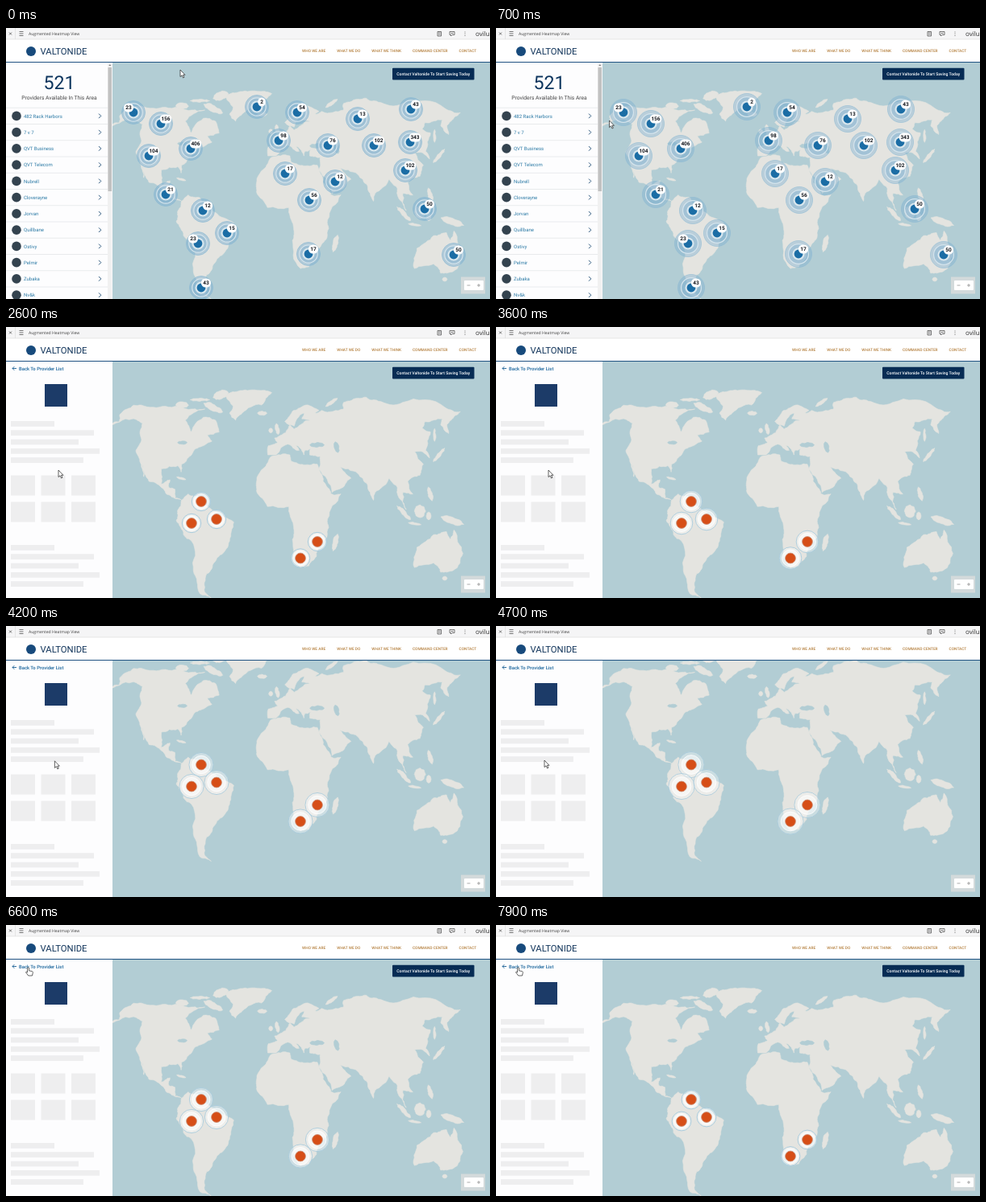
These frames come from a looping animation (600 by 337 pixels, 8 s). An HTML page:

```html
<!DOCTYPE html>
<html lang="en">
<head>
<meta charset="utf-8">
<title>Heatmap View</title>
<style>
  html, body { margin: 0; width: 100%; height: 100%; overflow: hidden; background: #fff; }
  svg { display: block; width: 100vw; height: 100vh; font-family: Roboto, "Liberation Sans", sans-serif; text-rendering: geometricPrecision; }
</style>
</head>
<body>
<svg id="stage" viewBox="0 0 600 337" preserveAspectRatio="none">
  <defs><clipPath id="view"><rect x="132" y="43" width="468" height="294"/></clipPath></defs>
  <g clip-path="url(#view)">
    <g id="map">
      <rect x="132" y="0" width="468" height="400" fill="#b2cdd4"/>
      <g id="land" stroke-linejoin="round" stroke-width=".6"></g>
      <g id="blue"></g>
      <g id="orange"></g>
      <rect x="479" y="49.700" width="101.500" height="14.800" rx="1" fill="#072c54"/>
      <text x="529.700" y="59" font-size="5.100" font-weight="500" fill="#fff" text-anchor="middle">Contact Valtonide To Start Saving Today</text>
    </g>
    <rect x="564" y="309.500" width="30" height="21" fill="#d3dadb"/>
    <rect x="568" y="314" width="24" height="12" rx="1" fill="#fff"/>
    <path d="M571.500 320h4M584 320h4M586 318v4" stroke="#888" stroke-width=".7"/>
  </g>
  <rect y="43" width="132" height="294" fill="#fdfdfe"/>
  <g id="list"></g>
  <g id="detail"></g>
  <rect width="600" height="43" fill="#fff"/>
  <rect width="600" height="14" fill="#f5f5f6"/>
  <path d="M0 14h600M11.500 0v14" stroke="#dedede" stroke-width=".7"/>
  <path d="M4 5.500l3 3m0-3l-3 3M16.500 4.500h5M16.500 7h5M16.500 9.500h5" stroke="#555" stroke-width=".8"/>
  <text x="28" y="9" font-size="5.100" fill="#444" font-family="Open Sans, sans-serif">Augmented Heatmap View</text>
  <g fill="none" stroke="#555" stroke-width=".8">
    <path d="M535 4.500h4.500v5.500h-4.500zM536 6h2.500M536 8h2.500M550 4.500h6v4h-3l-1.500 1.500v-1.500h-1.500zM551.500 6.500h3"/>
    <path d="M569 4.500v1M569 6.700v1M569 9v1"/>
  </g>
  <text x="582" y="10" font-size="8" fill="#333" font-family="Open Sans, sans-serif">ovilu</text>
  <circle cx="31" cy="29" r="6" fill="#174a7c"/>
  <text x="42.500" y="33" font-size="11.300" fill="#12355b">VALTONIDE</text>
  <g id="nav" font-size="4.800" font-weight="500" fill="#b5803f"></g>
  <rect y="42" width="600" height="1" fill="#1f5282"/>
  <path id="arrow" d="M0 0v8.600l2-1.800 1.500 3.200 1.400-.7-1.500-3h2.600z" fill="#fff" stroke="#222" stroke-width=".7"/>
  <path id="hand" d="M-1.500 1.500q1-1.500 2 0v3.300l4 .8q1 .4 .8 1.800l-.8 3.600h-4.800l-3.200-4.300q.3-1.200 2 .2z" fill="#fff" stroke="#222" stroke-width=".7"/>
</svg>
<script>
const $ = id => document.getElementById(id);
const NS = 'http://www.w3.org/2000/svg';
function add(parent, tag, attrs, text) {
  const el = document.createElementNS(NS, tag);
  for (const k in attrs) el.setAttribute(k, attrs[k]);
  if (text) el.textContent = text;
  return parent.appendChild(el);
}
const circle = (g, r, attrs) => add(g, 'circle', { r, ...attrs });

const LAND = '#e4e4e0', SEA = '#b2cdd4';
let seed = 7;
const random = () => (seed = seed * 16807 % 2147483647) / 2147483647;

// Robinson-like projection, centred on 10 degrees east
function project([lon, lat]) {
  const a = lat / 90, b = a * a;
  return [352 + 1.55 * (lon - 10) * (1 - .384 * b - .125 * b * b),
          231 - 157 * a * (1.117 - .09 * b * b)];
}
// Splits an edge at a randomly displaced middle to roughen the coast
function rough([x1, y1], [x2, y2], depth = 3) {
  const dx = x2 - x1, dy = y2 - y1;
  if (!depth || Math.hypot(dx, dy) < 3) return [[x2, y2]];
  const k = (random() - .5) * .25;
  const mid = [(x1 + x2) / 2 - dy * k, (y1 + y2) / 2 + dx * k];
  return [...rough([x1, y1], mid, depth - 1), ...rough(mid, [x2, y2], depth - 1)];
}
function shape(points, fill) {
  const coast = points.flatMap((p, i) => rough(p, points[(i + 1) % points.length]));
  add($('land'), 'path', { d: 'M' + coast.map(p => p.map(v => v.toFixed(1))).join('L') + 'Z', fill, stroke: fill });
}
// corners are "lon lat"
const continent = text => shape(text.split(',').map(p => project(p.split(' ').map(Number))), LAND);
// an oval of radii rx, ry, tilted by degrees
function blob(lon, lat, rx, ry, tilt = 0, fill = LAND) {
  const [cx, cy] = project([lon, lat]), a = tilt * Math.PI / 180;
  shape(Array.from({ length: 8 }, (_, i) => {
    const u = rx * Math.cos(i * Math.PI / 4), v = ry * Math.sin(i * Math.PI / 4);
    return [cx + u * Math.cos(a) - v * Math.sin(a), cy + u * Math.sin(a) + v * Math.cos(a)];
  }), fill);
}

// North America, Greenland, South America, Africa, Eurasia, Australia
continent('-166 68,-157 71,-128 70,-96 68,-82 68,-94 60,-82 52,-78 62,-64 60,-56 52,-66 50,-60 46,-70 42,-76 36,-81 31,-80 26,-84 30,-97 28,-95 18,-88 21,-88 16,-83 15,-82 9,-77 8,-85 10,-94 16,-105 20,-114 31,-110 23,-117 33,-124 40,-124 47,-134 58,-148 61,-164 55,-158 59,-166 64');
continent('-70 78,-53 70,-53 65,-44 60,-40 65,-22 71,-14 81,-35 83,-60 82');
continent('-77 8,-72 12,-62 10,-50 1,-35 -6,-39 -18,-48 -27,-57 -36,-62 -39,-69 -51,-65 -55,-74 -52,-73 -37,-70 -18,-76 -14,-81 -5,-80 1');
continent('-6 36,10 37,11 33,20 31,33 31,37 20,43 12,51 12,40 -4,40 -15,35 -21,32 -28,26 -34,19 -35,12 -17,13 -9,9 1,9 4,-8 4,-17 14,-17 21,-10 30');
continent('-9 37,-9 43,-1 45,-4 48,8 54,10 57,14 54,24 59,30 60,22 61,25 65,17 61,14 56,5 59,14 67,28 71,41 67,36 65,44 67,68 68,72 73,80 74,104 77,113 74,140 73,180 69,190 66,170 60,162 57,157 51,156 57,163 61,143 59,136 55,141 52,128 40,129 35,125 39,118 39,122 31,117 24,106 20,109 12,101 13,103 2,98 9,97 16,91 22,80 14,77 8,73 18,66 25,50 30,56 25,60 22,54 17,44 13,34 28,36 36,27 37,28 41,23 40,22 37,13 45,18 40,8 44,-2 37');
continent('114 -22,126 -14,136 -12,140 -17,142 -11,153 -26,150 -37,140 -38,131 -32,116 -35');
// Arctic islands
blob(-74, 69, 13, 4, 25);
blob(-111, 71, 8, 4);
blob(-97, 75, 12, 2);
blob(-78, 79, 10, 5, -20);
blob(-19, 65, 6, 2.5);
blob(58, 73, 9, 2, -35);
// Atlantic and Indian Ocean
blob(-2, 54, 2.5, 7, -10);
blob(-8, 53, 2.5, 3);
blob(-79, 22, 6, 1.2, 15);
blob(47, -19, 3, 11, 15);
// Pacific rim
blob(138, 37, 11, 2.5, -50);
blob(143, 50, 1.5, 8);
blob(123, 12, 2.5, 9, -15);
blob(101, 0, 12, 2.8, 45);
blob(114, 1, 7, 8);
blob(110, -7, 8, 1.3, 8);
blob(121, -2, 3, 5);
blob(140, -5, 15, 4, 18);
blob(146, -42, 3, 2.5);
// Inland water
blob(34, 43.5, 9, 3, 0, SEA);
blob(51, 42, 3, 7, -15, SEA);
blob(-86, 45, 6, 2, 0, SEA);

const pinAt = (layer, x, y) => add($(layer), 'g', { transform: `translate(${x} ${y})` });
function bluePin(text) {
  const [x, y, n] = text.split(' ');
  const g = pinAt('blue', x, y);
  const halo = circle(g, 14, { fill: '#79adcf', 'fill-opacity': .55, stroke: '#8ab8d4', 'stroke-width': .8 });
  const ring = circle(g, 11, { fill: '#79adcf', 'fill-opacity': .35, stroke: '#d5e4ec', 'stroke-width': 1.2 });
  circle(g, 7.6, { fill: '#dfebf1', 'fill-opacity': .9 });
  circle(g, 5.4, { fill: '#1b6da5' });
  const lx = n === '23' ? -6 : 6, w = 7 + 2.6 * n.length;
  add(g, 'rect', { x: lx - w / 2, y: -11.5, width: w, height: 11, rx: 5.5, fill: '#fff' });
  add(g, 'text', { x: lx, y: -3.7, 'font-size': 6.5, 'font-weight': 700, fill: '#161a20', 'text-anchor': 'middle' }, n);
  return { halo, ring };
}
function orangePin(text) {
  const g = pinAt('orange', ...text.split(' '));
  const halo = circle(g, 13, { fill: '#fff', 'fill-opacity': .4, stroke: '#a9cbdc', 'stroke-width': 1 });
  const ring = circle(g, 10, { fill: '#fff', 'fill-opacity': .5, stroke: '#fff', 'stroke-width': .8 });
  circle(g, 6.4, { fill: '#d64e17', stroke: '#c98d74', 'stroke-width': .8 });
  return { halo, ring };
}
// "x y count"
const bluePins = '158 105 23,192 119 156,177 159 104,229 150 406,198 207 21,311 98 2,361 105 54,338 140 98,436 113 13,502 101 43,501 142 343,456 146 102,495 177 102,399 146 76,408 191 12,346 181 17,376 214 56,519 225 50,555 282 50,375 281 17,244 227 12,274 255 15,238 268 23,242 323 43'.split(',').map(bluePin);
const orangePins = '242 217,230 244,261 239,386 267,365 287.5'.split(',').map(orangePin);

// Provider list
const list = $('list');
const ROW = 20.25;
const rowY = i => 109.4 + ROW * i;
add(list, 'text', { x: 66, y: 76, 'font-size': 23.2, fill: '#0d355e', 'text-anchor': 'middle' }, '521');
add(list, 'text', { x: 66, y: 88.5, 'font-size': 6.7, fill: '#444', 'text-anchor': 'middle' }, 'Providers Available In This Area');
const hover = add(list, 'rect', { width: 126, height: 20, fill: '#d3e5ef' });
['482 Rack Harbors', '7 v 7', 'QVT Business', 'QVT Telecom', 'Nubrell', 'Cloverayne', 'Jorvan', 'Quillbane', 'Ostivy', 'Pelmir', 'Zubaka', 'Nv&k']
  .forEach((name, i) => {
    const y = rowY(i);
    add(list, 'path', { d: `M0 ${y - ROW / 2}h126`, stroke: '#e0e3e6', 'stroke-width': .7 });
    circle(list, 5.8, { cx: 13, cy: y, fill: '#34434f' });
    add(list, 'text', { x: 22, y: y + 2.2, 'font-size': 6, fill: '#2d7ba6' }, name);
    add(list, 'path', { d: `M115 ${y - 2.8}l2.800 2.800l-2.800 2.800`, fill: 'none', stroke: '#1b4a72', 'stroke-width': .9 });
  });
add(list, 'rect', { x: 126, y: 43, width: 5.5, height: 294, fill: '#f1f1f1' });
add(list, 'rect', { x: 126.5, y: 49, width: 4.5, height: 154, fill: '#c1c1c1' });
add(list, 'path', { d: 'M127.300 47l1.500-1.700l1.500 1.700z', fill: '#777' });

// Provider page
const detail = $('detail');
add(detail, 'path', { d: 'M13 51.500h-5m2.300-2.300l-2.300 2.300l2.300 2.300', fill: 'none', stroke: '#1a5f95', 'stroke-width': .9 });
add(detail, 'text', { x: 16, y: 53.6, 'font-size': 5.9, 'font-weight': 500, fill: '#1a659c' }, 'Back To Provider List');
add(detail, 'rect', { x: 48, y: 71, width: 28, height: 28, fill: '#1c3b68' });
const block = (x, y, width, height) => add(detail, 'rect', { x, y, width, height, fill: '#eeeeef' });
for (const top of [117, 271])
  [54, 103, 84, 110, 90].forEach((w, i) => block(6, top + 11.3 * i, w, 6.8));
for (let i = 0; i < 6; i++) block(6 + 37.5 * (i % 3), 184.5 + 33 * Math.floor(i / 3), 30, 25);

let navX = 367;
for (const label of ['WHO WE ARE', 'WHAT WE DO', 'WHAT WE THINK', 'COMMAND CENTER', 'CONTACT']) {
  const item = add($('nav'), 'text', { x: navX, y: 30 }, label);
  navX += item.getComputedTextLength() + 14;
}

// Motion
function ramp(t, from, to) {
  const u = Math.min(1, Math.max(0, (t - from) / (to - from)));
  return u * u * (3 - 2 * u);
}
const PERIOD = 2600, OPEN = 2500, STILL = 2200;
function pulse(pins, time, base, grow, fade) {
  const phase = time % PERIOD / PERIOD;
  for (const { halo, ring } of pins) {
    halo.setAttribute('r', base + grow * phase);
    halo.setAttribute('opacity', 1 - fade * phase);
    ring.setAttribute('r', base - 2.5 + grow * .6 * phase);
  }
}
const show = (el, on) => el.setAttribute('display', on ? 'inline' : 'none');

function draw(now) {
  const t = Math.floor(now % 8000 / 100) * 100;
  const open = t >= OPEN;
  for (const id of ['list', 'blue']) show($(id), !open);
  for (const id of ['detail', 'orange']) show($(id), open);
  pulse(bluePins, Math.min(t, STILL) + 700, 12.5, 7.5, .5);
  pulse(orangePins, t, 11.7, 5.5, .25);

  const scroll = 44.5 * (ramp(t, 3800, 4100) - ramp(t, 4800, 5050));
  $('map').setAttribute('transform', `translate(0 ${-scroll})`);

  const toList = ramp(t, 200, 1200), drift = ramp(t, 3700, 4300), toBack = ramp(t, 5300, 6200);
  const x = 216 - 151 * toList - 5 * drift - 32 * toBack;
  const y = 52 + 126 * toList - 11 * drift - 115 * toBack;
  const row = Math.round((y - rowY(0)) / ROW);
  const over = !open && x < 126 && row >= 0;
  show(hover, over);
  hover.setAttribute('y', rowY(row) - 10);
  const pointing = over || (open && y < 56);
  show($('hand'), pointing);
  show($('arrow'), !pointing);
  $(pointing ? 'hand' : 'arrow').setAttribute('transform', `translate(${x} ${y})`);
}
const start = performance.now();
(function tick() {
  draw(performance.now() - start);
  requestAnimationFrame(tick);
})();
</script>
</body>
</html>
```
